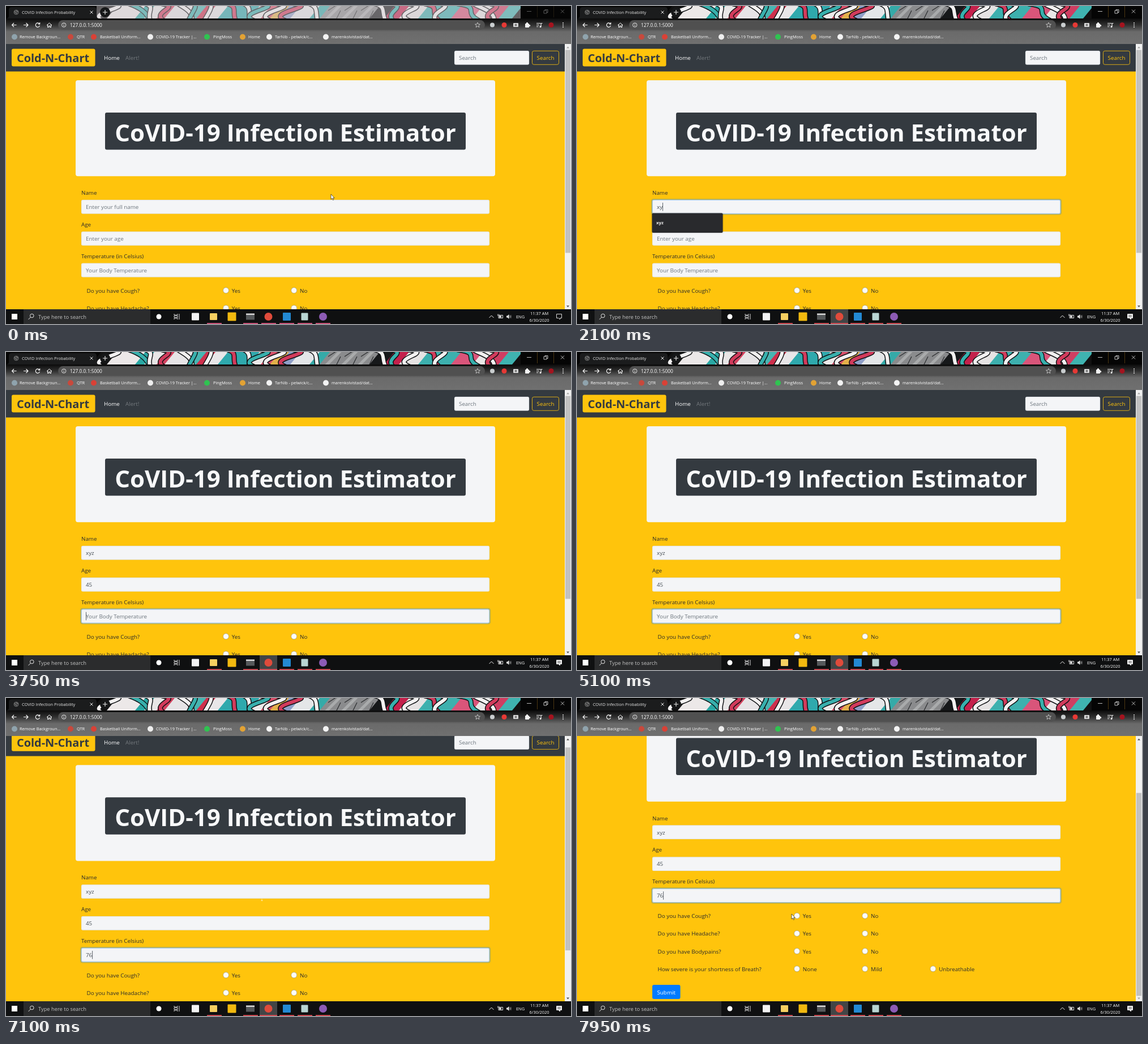
Write an HTML page with a canvas that moves like this. It is 998x561 px and loops after 8000 ms.

```html
<!DOCTYPE html>
<html lang="en">
<head>
<meta charset="utf-8">
<title>COVID Infection Probability</title>
<style>
  html, body { margin: 0; width: 100%; height: 100%; overflow: hidden; background: #000; }
  canvas { display: block; width: 998px; height: 561px; }
</style>
</head>
<body>
<canvas id="stage" width="998" height="561"></canvas>
<script>
const ctx = document.getElementById("stage").getContext("2d");
const LOOP = 8000, STEP = 50, SCROLL_MAX = 117.5;
const YELLOW = "#ffc40c", DARK = "#343a40", LIGHT = "#f4f5f7", INK = "#2b2c2a", MUTED = "#6c757d";
const INPUT_H = 24.5;

// Each entry: time, field, value after the key press. The first entry of a field gives it the focus.
const KEYS = [
  [950, 0, ""], [1950, 0, "x"], [2100, 0, "xy"], [2250, 0, "xyz"],
  [2700, 1, ""], [3400, 1, "4"], [3500, 1, "45"],
  [3600, 2, ""], [5500, 2, "7"], [5950, 2, "76"]
];
const FIELDS = [
  ["Name", "Enter your full name"],
  ["Age", "Enter your age"],
  ["Temperature (in Celsius)", "Your Body Temperature"]
];
const QUESTIONS = [
  ["Do you have Cough?", "Yes", "No"],
  ["Do you have Headache?", "Yes", "No"],
  ["Do you have Bodypains?", "Yes", "No"],
  ["How severe is your shortness of Breath?", "None", "Mild", "Unbreathable"]
];

const clamp = v => Math.max(0, Math.min(1, v));
const smooth = v => { v = clamp(v); return v * v * (3 - 2 * v); };
const mix = (a, b, p) => a + (b - a) * p;

function rect(x, y, w, h, color, r = 0) {
  ctx.fillStyle = color;
  ctx.beginPath();
  ctx.roundRect(x, y, w, h, r);
  ctx.fill();
}
function frame(x, y, w, h, color, r = 0, width = 0.7) {
  ctx.strokeStyle = color;
  ctx.lineWidth = width;
  ctx.beginPath();
  ctx.roundRect(x, y, w, h, r);
  ctx.stroke();
}
function disc(x, y, r, color, edge) {
  ctx.beginPath();
  ctx.arc(x, y, r, 0, 7);
  ctx.fillStyle = color;
  ctx.fill();
  if (edge) {
    ctx.strokeStyle = edge;
    ctx.lineWidth = 0.6;
    ctx.stroke();
  }
}
function line(path, color, width = 1) {
  ctx.strokeStyle = color;
  ctx.lineWidth = width;
  ctx.stroke(new Path2D(path));
}
function shape(path, color) {
  ctx.fillStyle = color;
  ctx.fill(new Path2D(path));
}
function text(s, x, y, size, color, weight = 400, align = "left") {
  ctx.font = `${weight} ${size}px "Open Sans", "Noto Sans", sans-serif`;
  ctx.textAlign = align;
  ctx.fillStyle = color;
  ctx.fillText(s, x, y);
}
function gradient(y0, y1, ...colors) {
  const g = ctx.createLinearGradient(0, y0, 0, y1);
  colors.forEach((c, i) => g.addColorStop(i / (colors.length - 1), c));
  return g;
}

// Painted wall behind the tab strip
const BANDS = [
  [160, "#111"], [188, "#ece8e8"], [238, "#2aa8a4"], [254, "#e8e6e6"], [276, "#d3415f"],
  [290, "#e6e4e6"], [330, "#48b5b2"], [346, "#cf2f4c"], [362, "#e8e6e8"],
  [384, "#2fa9ad"], [440, "#eceaea"], [460, "#d9506a"], [476, "#e3b04a"], [492, "#8f9fc8"],
  [512, "#e4e6e8"], [546, "#35aaa8"], [564, "#8a8b8d"], [652, "#16181a"], [678, "#c4214c"],
  [704, "#e6e3e3"], [738, "#3db0ae"], [796, "#d9557a"], [834, "#e9e7e7"], [862, "#cf3e62"],
  [880, "#3fb3b0"], [904, "#111"]
];
function wall(active) {
  let seed = 29;
  const rnd = () => (seed = seed * 16807 % 2147483647) / 2147483647;
  ctx.save();
  ctx.beginPath();
  ctx.rect(160, 0, 750, 22);
  ctx.clip();
  for (const [x, color] of BANDS) shape(`M${x + 8} 0H920V22H${x - 10}Z`, color);
  const paints = ["#f3f1f1", "#38b0ad", "#f3f1f1", "#d23b5c"];
  for (let x = 200, i = 0; x < 890; x += 29, i++) {
    const dx = rnd() * 60 - 30, bend = rnd() * 50 - 10;
    if (x > 560 && x < 650) {
      line(`M${x + 14} -2L${x - 12} 24`, "#a9abac", 5);
      line(`M${x - 8} 8l14 -9M${x + 6} 24l8 -16`, "#2b2d2f", 1.2);
      continue;
    }
    const path = `M${x - 12} -4C${x + bend} 2 ${x + dx - bend} 10 ${x + dx} 26`;
    line(path, "#101214", 9);
    line(path, paints[i % 4], 6);
  }
  if (!active) rect(160, 0, 750, 22, "rgba(205,198,202,.45)");
  ctx.restore();
}

const BOOKMARKS = [
  [15, "#8fa3ad", "Remove Backgroun...", 24], [114, "#c8493c", "QTR", 125],
  [155, "#d94136", "Basketball Uniform...", 166], [255, "#eeeeee", "COVID-19 Tracker |...", 265],
  [355, "#2fc351", "PingMoss", 366], [418, "#e2a234", "Home", 428],
  [465, "#f3f3f3", "TarNib - pelwick/c...", 475], [565, "#f3f3f3", "marenkolvistad/dat...", 575]
];
function browser(active) {
  rect(0, 0, 998, 23, "#050505");
  wall(active);
  rect(909, 0, 89, 22, "#050505");
  line("M938.5 0V20M967.5 0V20", active ? "#5e4214" : "#2a2214", 0.8);
  const glyph = active ? "#e8e8e8" : "#6b6b6b";
  line("M920 9.5H928M980 6.5l6 6M986 6.5l-6 6M950 8h5v5h-5ZM952 8v-1.5h5v5h-2", glyph, 0.8);

  // tab
  shape("M0 22Q5 22 5 17V7Q5 2 10 2H155Q160 2 160 7V17Q160 22 165 22Z", "#1b1c1d");
  disc(18, 11, 4, "#3a3b3c", "#9a9a9a");
  line("M14.5 10l3 1 1 3M18 7.5l1 2 3 .5", "#9a9a9a", 0.8);
  text("COVID Infection Probability", 28, 13.7, 7.5, "#e6e6e6");
  line("M148.5 8.5l5 5M153.5 8.5l-5 5", "#ededed");
  disc(175, 11, 9, "#161718");
  line("M171 11h8M175 7v8", "#f0f0f0", 1.1);

  // address row and bookmarks
  rect(0, 22, 998, 23, gradient(22, 45, "#0b0b0b", "#303030", "#686868"));
  rect(0, 45, 998, 22, gradient(45, 67, "#6a6a6a", "#707070"));
  rect(92, 25, 754, 17, "#505050", 8.5);
  line("M18.5 33.5H10.5M14 30l-3.5 3.5 3.5 3.5", "#fff", 1.1);
  line("M31 33.5h8M35.5 30l3.5 3.5 -3.5 3.5", "#fff", 1.1);
  line("M59 31.5a3.7 3.7 0 1 0 .5 3.2M59.7 29v3h-3", "#fff", 1.1);
  line("M72 34l4.5 -4 4.5 4M73.5 33v4.5h2v-2.5h2v2.5h2v-4.5", "#fff");
  line("M98.5 33.5a3.7 3.7 0 1 0 7.4 0a3.7 3.7 0 1 0 -7.4 0M102.2 33v2.5M102.2 31v1", "#f2f2f2", 0.9);
  text("127.0.0.1:5000", 113, 36.7, 8.4, "#fff");
  line("M833 29l1.3 3 3.2 .2 -2.5 2.1 .8 3.2 -2.8 -1.8 -2.8 1.8 .8 -3.2 -2.5 -2.1 3.2 -.2Z", "#d8d8d8", 0.8);
  disc(859, 33.5, 4, "#c9cdcf");
  disc(880, 33.5, 4.5, "#e53935");
  rect(896, 30, 9, 7, "#d6d6d6", 1);
  disc(900.5, 33.5, 2, "#777");
  rect(917, 31, 7, 7, "#f2f2f2", 1);
  disc(920.5, 30.5, 1.7, "#f2f2f2");
  disc(924.5, 34.5, 1.7, "#f2f2f2");
  line("M937 30.5h7M937 33.5h5M937 36.5h3.5M945 36.5v-6h2.5", "#f2f2f2", 1.2);
  disc(944, 36.5, 1.5, "#f2f2f2");
  disc(963, 33.5, 4.5, "#a3141f");
  for (const y of [30, 33.5, 37]) disc(984, y, 0.9, "#fff");
  for (const [x, color, label, tx] of BOOKMARKS) {
    disc(x, 54.5, 5, color);
    text(label, tx, 57.2, 7.4, "#fff");
  }
}

function input(x, y, w, h) {
  rect(x, y, w, h, LIGHT, 2.5);
  frame(x + 0.3, y + 0.3, w - 0.6, h - 0.6, "#ced4da", 2.5, 0.5);
}

const lastKey = keys => keys[keys.length - 1];
const pressedBy = t => KEYS.filter(([at, , value]) => value ? at <= t : at < t);
const focusTime = field => KEYS.find(k => k[1] === field)?.[0] ?? Infinity;
const focusLevel = (t, field) =>
  clamp((t - focusTime(field)) / 150) * (1 - clamp((t - focusTime(field + 1)) / 150));

function formField(t, index) {
  const [label, hint] = FIELDS[index], y = 342 + index * 55.9;
  const pressed = pressedBy(t), last = lastKey(pressed);
  const value = lastKey(pressed.filter(k => k[1] === index))?.[2] ?? "";
  const glow = focusLevel(t, index);

  text(label, 133, y - 9, 9.8, INK);
  ctx.globalAlpha = glow;
  rect(131, y - 2, 725, INPUT_H + 4, "rgba(0,123,255,.27)", 4);
  ctx.globalAlpha = 1;
  input(133, y, 721, INPUT_H);
  ctx.globalAlpha = glow;
  frame(133.3, y + 0.3, 720.4, INPUT_H - 0.6, "#80bdff", 2.5);
  ctx.globalAlpha = 1;
  text(value || hint, 141, y + 16, 9.8, value ? "#495057" : MUTED);

  if (last && last[1] === index && Math.floor((t - last[0]) / 500) % 2 === 0) {
    rect(141 + ctx.measureText(value).width, y + 5, 0.9, 14.5, "#495057");
  }
}

function suggestions(t) {
  if (t < 1050 || t >= 2250) return;
  const items = t < 2000 ? ["sdfds", "sdfs", "tarun", "Tarun", "sdsd", "sdfsd"] : ["xyz"];
  ctx.save();
  ctx.globalAlpha = clamp((t - 1000) / 150);
  ctx.shadowColor = "rgba(0,0,0,.4)";
  ctx.shadowBlur = 2;
  rect(132.5, 365.5, 125, 11 + items.length * 23.4, "#292a2d", 2);
  ctx.shadowColor = "transparent";
  items.forEach((s, i) => text(s, 140, 385.3 + i * 23.4, 7.8, "#f1f1f1", 700));
  ctx.restore();
}

function page(t, scroll) {
  ctx.save();
  ctx.beginPath();
  ctx.rect(0, 67, 987, 468);
  ctx.clip();
  rect(0, 67, 987, 468, YELLOW);
  ctx.translate(0, -scroll);

  rect(0, 67, 987, 48.4, DARK);
  rect(10, 75.5, 147.5, 31, YELLOW, 3);
  text("Cold-N-Chart", 19, 99, 19.9, DARK, 700);
  text("Home", 173, 95, 9.8, "#fff");
  text("Alert!", 211, 95, 9.8, "#74797d");
  input(792, 79, 132, INPUT_H);
  text("Search", 800, 95.3, 9.8, MUTED);
  frame(929.5, 79.3, 47, 24, YELLOW, 3, 0.8);
  text("Search", 953, 95.3, 9.8, YELLOW, 400, "center");

  rect(123, 131, 741, 169.3, LIGHT, 4);
  rect(175, 188, 637, 65.5, DARK, 3);
  text("CoVID-19 Infection Estimator", 493.5, 239.3, 42, "#f8f9fa", 700, "center");

  FIELDS.forEach((_, i) => formField(t, i));
  QUESTIONS.forEach(([question, ...answers], row) => {
    const y = 501.7 + row * 31.2;
    text(question, 142.5, y + 4, 9.85, INK);
    answers.forEach((answer, i) => {
      const x = 388.5 + i * 120.2;
      disc(x, y, 5, "#fbfbf8", "#8d8a78");
      text(answer, x + 10.3, y + 4, 9.85, INK);
    });
  });
  rect(133, 623.5, 49.5, 25, "#007bff", 3);
  text("Submit", 157.7, 640, 9.85, "#fff", 400, "center");
  ctx.restore();
  suggestions(t);

  rect(987, 67, 11, 468, "#f1f1f1");
  rect(988, 77.5 + scroll * 90 / SCROLL_MAX, 9, 358, "#c1c1c1");
  shape("M990 74.5h5l-2.5 -3Z", scroll ? "#505050" : "#a3a3a3");
  shape("M990 528.5h5l-2.5 3Z", scroll < SCROLL_MAX ? "#505050" : "#a3a3a3");
}

function taskbar(t, active) {
  rect(0, 535, 998, 26, "#0f1011");
  rect(31, 535, 224, 26, "#2b2c2d");
  rect(10, 543, 10, 10, "#fff");
  line("M42.5 546.5a3.3 3.3 0 1 1 6.6 0a3.3 3.3 0 1 1 -6.6 0M43.5 549l-4 4", "#e8e8e8");
  text("Type here to search", 57, 551.5, 9.3, "#c2c2c2");
  disc(270, 548, 4.5, "#fff");
  line("M297 543v2h6v-2M297 553v-2h6v2M297 546.5h6v3h-6ZM306 543v10", "#e8e8e8", 0.9);
  if (active) rect(448, 535, 31, 26, "#434546");

  rect(328, 541.5, 13, 13, "#f3f3f3", 1);
  rect(360, 542, 13, 12, "#f6cf61", 1);
  rect(391.5, 540.5, 15, 15, "#f2b90f", 1);
  rect(424, 542.5, 15, 11, "#56595b");
  rect(424, 542.5, 15, 2.5, "#d5d5d5");
  disc(463.5, 548, 7, "#df4b3b");
  rect(489, 541, 14, 14, "#2389d3", 1);
  rect(521.5, 541.5, 12, 13, "#b9d5d3", 1);
  disc(560, 548, 7, "#8c5bb5");
  for (const x of [355, 419, 451, 483, 515, 547]) {
    const wide = active && x === 451;
    rect(wide ? 448 : x, 559.3, wide ? 31 : 26, 1.7, active ? "#e24c55" : "#e35a87");
  }

  line("M853.5 550l4 -4 4 4", "#f0f0f0");
  frame(870, 545.5, 7.5, 5, "#f0f0f0", 0, 0.9);
  rect(871, 546.5, 4, 3, "#f0f0f0");
  line("M868.5 543.5v3M870.5 543.5v3", "#f0f0f0", 0.8);
  shape("M884 546.5h1.8l2.7 -2.5v8l-2.7 -2.5h-1.8Z", "#f0f0f0");
  line("M890 546q1.5 2 0 4", "#f0f0f0", 0.8);
  line("M891.5 544.8q2.3 3.2 0 6.4", "#8a8a8a", 0.8);
  text("ENG", 908.5, 551, 7.4, "#fff", 400, "center");
  text("11:37 AM", 942, 545, 7.4, "#fff", 400, "center");
  text("6/30/2020", 942, 557, 7.4, "#fff", 400, "center");
  const bubble = "M972.5 543.5h9v7h-3v2.5l-2.5 -2.5h-3.5Z";
  if (t >= 1650) {
    shape(bubble, "#fff");
    line("M974 545.5h6M974 547h6M974 548.5h6", "#222", 0.6);
  }
  line(bubble, "#f0f0f0", 0.9);
}

function arrow(x, y) {
  const path = `M${x} ${y}v9l2 -1.8 1.5 3.2 1.3 -.6 -1.4 -3.1h2.8Z`;
  shape(path, "#fff");
  line(path, "#222", 0.7);
}
function pointer(t) {
  if (t < 1000) return arrow(t < 600 ? 574 : t < 650 ? 556 : 538, 332);
  if (t < 6950) return;
  const p = smooth((t - 7450) / 300);
  if (p) arrow(mix(452, 379, p), mix(352, 381, p));
  else line("M450.5 357.5h3M452 354.5v3", "#fbf3d0", 0.8);
}

function draw(t) {
  const active = t >= 1000;
  // two wheel notches, the second one stopped by the end of the page
  const scroll = 65 * smooth((t - 7043) / 200) + (SCROLL_MAX - 65) * smooth((t - 7230) / 220);
  page(t, scroll);
  browser(active);
  taskbar(t, active);
  pointer(t);
}

const begin = performance.now();
function tick() {
  const t = (performance.now() - begin) % LOOP;
  draw(Math.floor(t / STEP) * STEP);
  requestAnimationFrame(tick);
}
tick();
</script>
</body>
</html>
```
